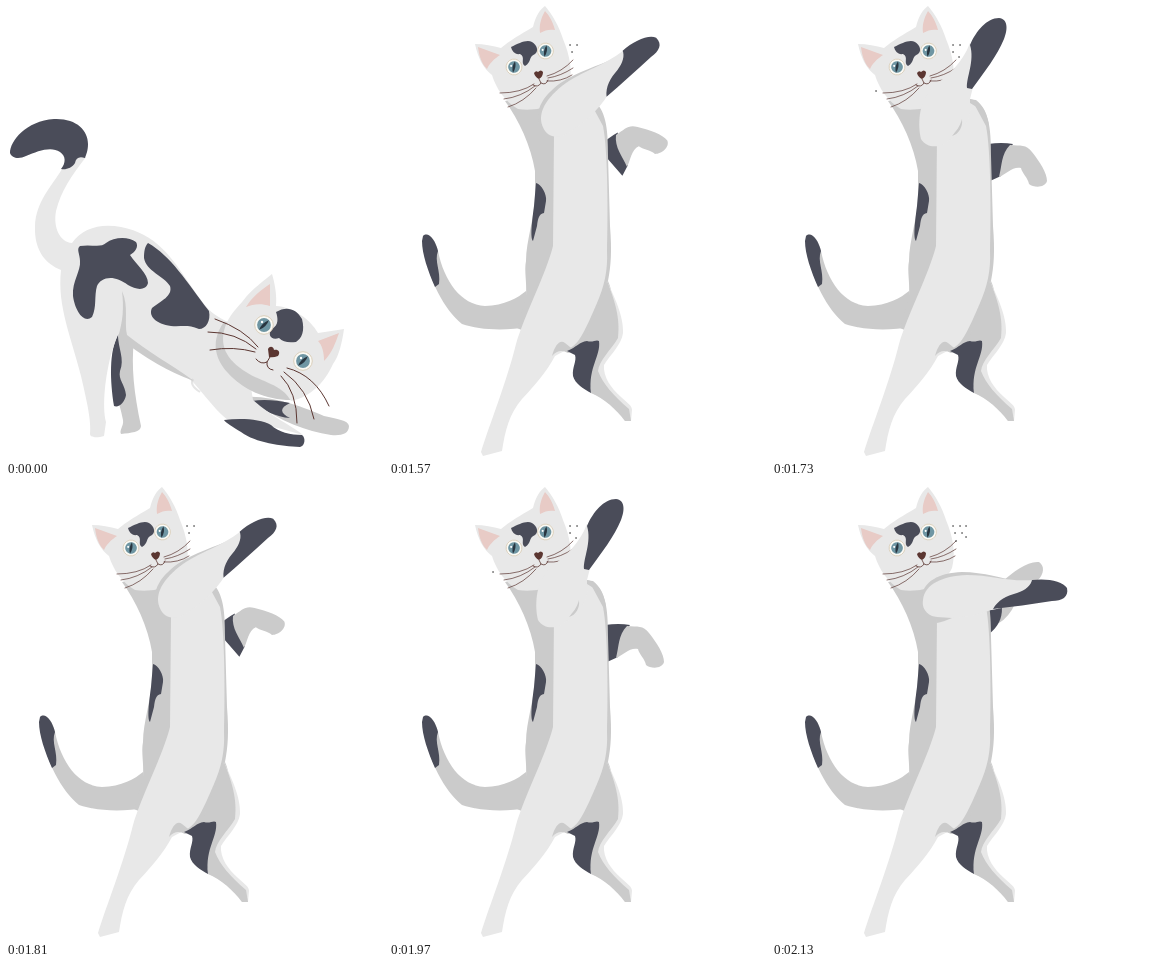
Write an HTML page without scripts that moves like this. It is 377 px wide and 453 px high and loops after 2.21 s.

```html
<!DOCTYPE html>
<html lang="en">
<head>
<meta charset="utf-8">
<title>Dancing cat</title>
<style>
html, body { margin: 0; width: 100%; height: 100%; overflow: hidden; background: #fff; }
svg { display: block; width: 377px; height: 453px; }
.light { fill: #e8e8e8; }
.shade { fill: #cbcbcb; }
.dark { fill: #4a4c59; }
.pink { fill: #e8cbc6; }
.nose { fill: #5b3631; }
.line { fill: none; stroke: #5b3631; stroke-linecap: round; }
.fold { fill: none; stroke: #cbcbcb; stroke-width: 2; }
.dots { fill: none; stroke: #333; stroke-width: 1.6; stroke-linecap: round; }
.stretch, .stand, .up, .mid, .out { animation: stretch 2210ms step-end infinite; }
.stand { animation-name: stand; }
.up { animation-name: up; }
.mid { animation-name: mid; }
.out { animation-name: out; }
@keyframes stretch {
  0% { visibility: visible; }
  67.421%, 100% { visibility: hidden; }
}
@keyframes stand {
  0% { visibility: hidden; }
  67.421%, 100% { visibility: visible; }
}
/* three arm poses, 80 ms each, played three times */
@keyframes up {
  0%, 71.041%, 81.9%, 92.76%, 100% { visibility: hidden; }
  67.421%, 78.281%, 89.14% { visibility: visible; }
}
@keyframes mid {
  0%, 74.661%, 85.52%, 96.38%, 100% { visibility: hidden; }
  71.041%, 81.9%, 92.76% { visibility: visible; }
}
@keyframes out {
  0%, 78.281%, 89.14% { visibility: hidden; }
  74.661%, 85.52%, 96.38%, 100% { visibility: visible; }
}
</style>
</head>
<body>
<svg viewBox="0 0 377 453">
  <defs>
    <g id="eye">
      <circle r="9.3" fill="#fbfaf5" stroke="#d8cbb5" stroke-width=".9"/>
      <circle r="6.9" fill="#6f96a3"/>
      <path d="M-4.8 4.8Q-2.6-2 4.8-4.8Q2.6 2-4.8 4.8" fill="#293640"/>
      <circle cx="-2" cy="-3" r="1.2" fill="#fff"/>
    </g>
    <g id="outArm">
      <path class="shade" d="M149 112C151 94 167 86 190 85C212 85 232 92 245 94L220 106L160 124Z"/>
      <path class="light" d="M151 113C153 97 170 89 195 88C220 88 235 95 262 93C261 105 240 112 221 122C203 130 175 133 160 129C152 125 150 119 151 113Z"/>
      <path class="dark" d="M260 93C275 91 291 94 295 101C297 110 290 114 280 114C260 117 240 120 221 122C226 113 234 109 245 106C254 103 259 98 260 93Z"/>
    </g>
    <g id="backArm">
      <path class="dark" d="M216 138Q230 136 241 138C233 148 231 160 229 170L218 175Z"/>
      <path class="shade" d="M238 139C249 140 254 138 260 146C268 156 275 167 275 175C273 182 262 182 257 178C256 172 250 167 249 162C241 160 234 168 227 171C230 160 229 148 238 139Z"/>
    </g>
  </defs>

  <g class="stretch">
    <path class="shade" d="M112 328L128 334C125 360 128 387 135 420C135 426 125 427 115 428C113 424 118 420 117 414C114 395 104 378 106 350Z"/>
    <path class="dark" d="M112 329C103 345 104 375 108 400C113 402 119 396 120 389C119 378 112 374 114 365C119 353 112 342 112 329Z"/>
    <path class="shade" d="M240 391C265 389 300 402 318 410C331 413 342 414 343 420C343 428 335 430 325 429C300 425 275 416 248 396Z"/>
    <path class="dark" d="M246 395C257 393 270 394 284 397C273 402 274 407 284 412C270 411 258 405 246 395Z"/>
    <path class="light" d="M56 163C46 180 30 195 29 220C28 245 40 258 55 264C51 300 65 330 75 370C82 400 85 415 84 428C84 432 92 432 98 430L100 416C96 400 99 370 106 345L112 328C140 345 165 360 187 376C202 393 212 407 222 414L272 422L297 429C285 419 266 411 247 394L240 350L222 316C205 308 200 302 185 280C165 250 150 228 115 221C95 217 76 222 66 237C54 236 47 222 50 205C55 185 65 170 80 151L66 150Z"/>
    <path class="shade" d="M116 285C123 300 118 316 121 329C142 346 163 357 188 375Q151 362 112 331C117 315 118 302 116 285Z"/>
    <path class="fold" d="M187 373Q183 379 194 386" stroke-opacity=".5"/>
    <path class="dark" d="M4 147C4 135 20 115 48 113C70 112 82 124 82 138C82 145 80 149 79 152C73 150 70 152 69 157C66 162 60 164 55 163C60 157 60 150 54 146C45 140 32 145 20 150C14 153 6 153 4 147Z"/>
    <path class="dark" d="M74 240C85 238 95 242 100 237C108 231 122 230 130 236C133 241 129 246 124 249C130 258 142 268 142 277C140 285 130 284 122 279C108 268 95 271 91 280C88 290 91 301 86 311C78 318 69 305 67 290C66 275 75 265 74 255C74 248 70 243 74 240Z"/>
    <path class="dark" d="M142 237C165 250 180 275 203 305C205 315 200 323 193 323C181 318 176 321 165 320C150 318 142 310 146 302C155 295 167 290 164 280C158 270 140 265 138 252C138 245 139 240 142 237Z"/>
    <path class="dark" d="M218 414C235 412 255 413 265 419C272 426 285 429 296 429C300 432 299 440 294 441C275 440 250 437 235 426C227 421 220 417 218 414Z"/>
    <path class="shade" d="M218 316C205 334 208 352 222 367C237 384 262 395 288 394L305 365L245 320Z"/>
    <path class="light" d="M221 316C226 306 234 299 240 291C247 283 257 275 266 268C269 278 271 290 270 300C287 301 304 313 312 327C321 326 330 324 338 323C336 337 333 350 327 358C319 376 305 391 285 395C276 378 255 376 240 366C221 354 211 339 221 316Z"/>
    <path class="pink" d="M264 278L264 300C255 297 247 298 240 301C246 291 255 284 264 278ZM333 327C329 338 326 347 318 355C318 346 316 339 312 335Z"/>
    <path class="dark" d="M270 306C280 300 290 302 296 313C299 325 296 332 290 336C282 337 277 336 273 332C265 335 261 328 266 323C273 319 272 312 270 306Z"/>
    <use href="#eye" x="258" y="319"/>
    <use href="#eye" x="297" y="355"/>
    <path class="nose" d="M262 343C264 339 268 341 268 344C272 343 275 346 272 350Q267 352 263 351Z"/>
    <path class="line" d="M264 351L261 356Q255 359 250 353M261 356Q260 363 267 364"/>
    <path class="line" d="M252 341Q238 323 209 313M250 343Q230 326 202 326M249 346Q228 340 204 344M281 362Q309 369 323 400M278 366Q302 383 308 413M275 370Q291 386 291 417"/>
  </g>

  <g class="stand">
    <path class="shade" d="M34 230C40 225 47 235 49 245C55 275 72 299 96 300C115 300 130 291 137 285L140 321C115 325 90 324 73 318C55 303 40 275 34 240Z"/>
    <path class="dark" d="M34 230C39 225 46 233 49 245C45 255 52 265 50 278L46 281C39 265 33 248 33 235Z"/>
    <g class="up"><use href="#backArm"/></g>
    <g class="mid"><use href="#backArm" transform="rotate(-38 218 150)"/></g>
    <g class="out">
      <path class="shade" d="M228 96C243 84 255 74 267 75C273 79 272 87 266 93L240 104ZM226 120L243 117Q237 130 227 136Z"/>
      <path class="dark" d="M214 124L230 121C230 132 226 140 217 147Z"/>
    </g>
    <path class="shade" d="M116 95C130 114 142 140 146 165L146 190C146 210 137 235 137 255C135 265 138 275 137 290L128 322L180 345L210 336C222 322 228 295 219 275C222 260 223 245 221 220L219 150C219 122 217 104 204 94L150 88Z"/>
    <path class="light" d="M218 275C224 288 235 310 234 327C233 338 221 349 215 359C214 371 222 382 232 391C238 397 243 399 243 404L242 415L236 415C228 404 215 392 202 387L205 340Z"/>
    <path class="shade" d="M218 275C228 300 231 315 229 332C222 344 210 354 209 365C214 378 224 389 240 403L242 415L236 415C228 404 215 392 202 387L195 338Z"/>
    <path class="light" d="M165 130L164 240C157 268 135 310 127 338C118 375 100 420 92 446L94 450L113 445C116 425 120 408 133 393C147 378 158 365 166 350L179 343C190 340 198 320 208 297C215 281 219 265 218 245C219 210 219 145 214 120L200 94Z"/>
    <path class="shade" d="M163 350C166 339 171 333 176 337L186 345L179 347Q170 342 163 350Z"/>
    <path class="dark" d="M178 345C188 341 190 336 198 335C204 337 207 333 210 335C212 350 199 361 202 387C195 383 186 378 184 370C183 361 188 355 186 349Z"/>
    <path class="dark" d="M147 177C152 178 158 188 157 195L155 207C150 208 149 212 148 220L144 235C141 232 143 215 145 200Z"/>
    <path class="light" d="M86 38C95 38 104 40 112 42C120 35 132 28 144 21C146 12 150 4 156 0C163 8 170 20 174 33C181 50 184 66 180 81C172 99 150 106 129 103C116 96 107 82 103 69C94 62 89 52 86 38Z"/>
    <path class="pink" d="M89 41L111 49C105 53 100 58 98 63C92 57 90 49 89 41ZM156 5C152 12 150 19 151 27C156 24 161 23 166 24C164 16 160 9 156 5Z"/>
    <path class="dark" d="M122 41C130 37 138 33 143 36C148 39 150 45 146 48C139 51 143 56 136 60C131 57 137 51 131 48C126 49 123 45 122 41Z"/>
    <use href="#eye" transform="translate(125 61) rotate(-35) scale(.85)"/>
    <use href="#eye" transform="translate(156.500 45) rotate(-35) scale(.85)"/>
    <path class="nose" d="M145 67Q147 64 149 66Q152 63 154 66Q154 71 150 73Q146 71 145 67Z"/>
    <path class="line" stroke-width=".8" d="M150 73L152 77Q149 82 144 79M152 77Q157 80 159 74"/>
    <path class="line" stroke-width=".7" d="M145 78Q132 87 111 87M146 80Q132 91 115 93M147 82Q135 96 119 101M158 70Q173 66 184 54M159 72Q172 70 184 62M158 75Q172 76 183 69"/>

    <g class="up">
      <path class="light" d="M198 37C190 58 176 69 161 81C148 93 145 115 149 133C154 142 167 142 173 137L184 130C192 125 201 108 198 93L201 81C205 65 203 50 198 37Z"/>
      <path class="shade" d="M198 93C207 94 215 104 217 120Q211 103 198 97ZM180 130C184 125 188 121 190 113C191 121 187 128 180 130Z"/>
      <path class="dark" d="M198 39C204 25 215 12 227 12C236 13 236 23 232 33C225 50 213 65 200 83L195 82C194 72 203 55 198 39Z"/>
      <path class="dots" d="M181 39h.1M188 39h.1M181 46h.1M187 51h.1M104 85h.1"/>
    </g>
    <g class="mid">
      <use href="#outArm" transform="rotate(-34 168 112)"/>
      <path class="dots" d="M181 39h.1M188 39h.1M183 46h.1"/>
    </g>
    <g class="out">
      <use href="#outArm"/>
      <path class="shade" d="M165 130L180 131Q171 135 165 136Z"/>
      <path class="dots" d="M181 39h.1M188 39h.1M194 39h.1M183 46h.1M190 46h.1M184 54h.1M194 50h.1"/>
    </g>
  </g>
</svg>
</body>
</html>
```
